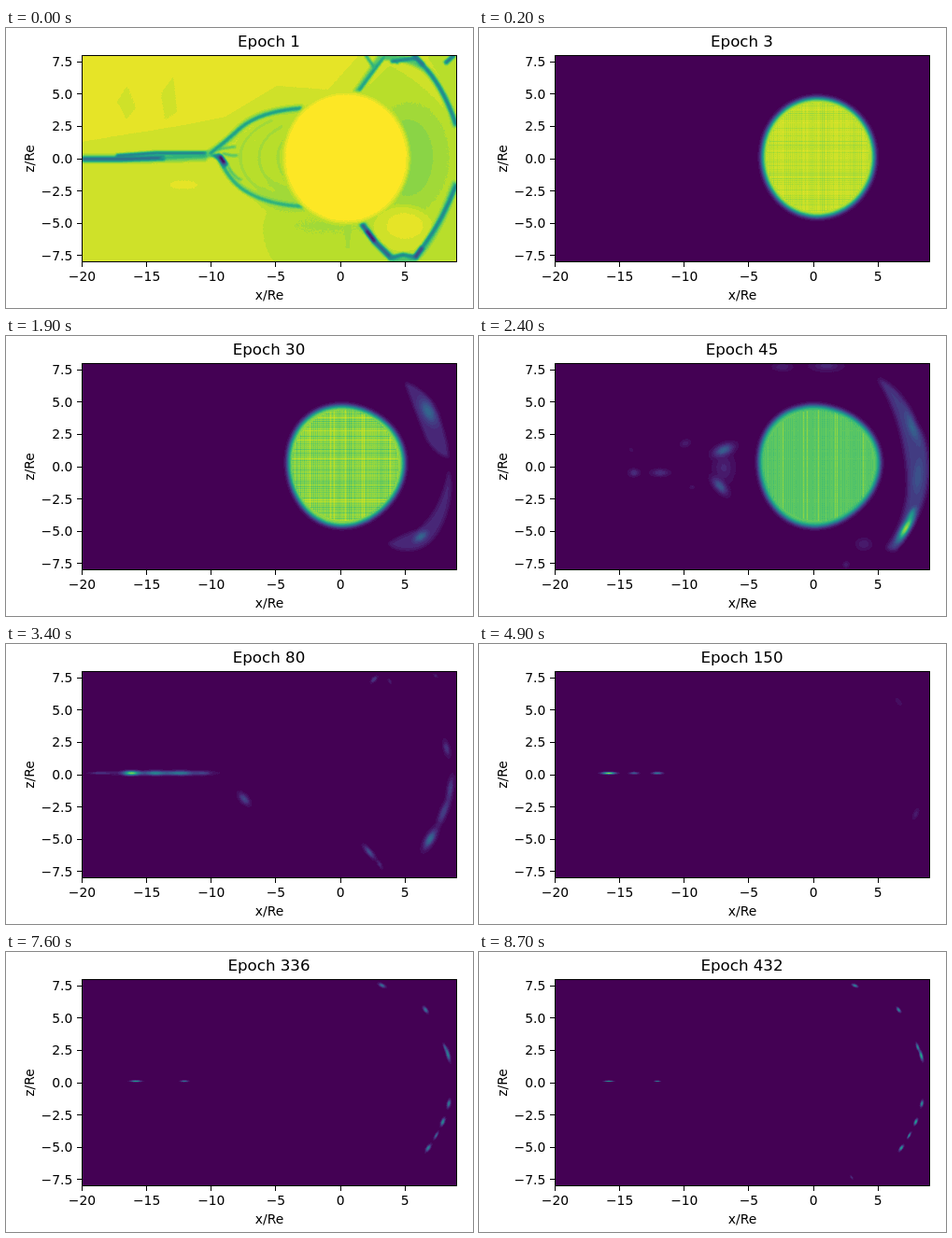
An HTML page with a canvas that plays this animation: 500 px wide and 300 px high, repeating every 8800 ms.

```html
<!DOCTYPE html>
<html lang="en">
<head>
<meta charset="utf-8">
<title>Epoch plot</title>
<style>
  html, body { margin: 0; width: 100%; height: 100%; overflow: hidden; background: #fff; }
  canvas { position: absolute; left: 81px; top: 29px; }
  svg { position: absolute; left: 0; top: 0; font: 13.89px "DejaVu Sans", sans-serif; }
  .lines { fill: none; stroke: #000; shape-rendering: crispEdges; }
</style>
</head>
<body>
<canvas id="field" width="402" height="222"></canvas>
<svg width="500" height="300" viewBox="0 0 500 300">
  <path id="ticks" class="lines"/>
  <rect class="lines" x="81.5" y="29.5" width="401" height="221"/>
  <g id="xLabels" text-anchor="middle"></g>
  <g id="zLabels" text-anchor="end"></g>
  <text x="282" y="291" text-anchor="middle">x/Re</text>
  <text transform="translate(30 140) rotate(-90)" text-anchor="middle">z/Re</text>
  <text id="title" x="281.5" y="20" text-anchor="middle" font-size="16.67">Epoch 1</text>
</svg>
<script>
const STEP = 100, FRAMES = 88, LEVELS = 28, UNIT = 401 / 29;
const $ = id => document.getElementById(id);
const W = 402, H = 222;
const ctx = $('field').getContext('2d', { willReadFrequently: true });

// Axes
const snap = v => Math.floor(v) + 0.5;
const minus = s => s.replace('-', '\u2212');
let tickPath = '', xText = '', zText = '';
for (let x = -20; x <= 5; x += 5) {
  const px = 81.5 + (x + 20) * UNIT;
  tickPath += `M${snap(px)} 251v4.5`;
  xText += `<text x="${px}" y="271">${minus('' + x)}</text>`;
}
for (let z = -7.5; z <= 7.5; z += 2.5) {
  const py = 140 - z * UNIT;
  tickPath += `M81 ${snap(py)}h-5`;
  zText += `<text x="71.3" y="${py + 5}">${minus(z.toFixed(1))}</text>`;
}
$('ticks').setAttribute('d', tickPath);
$('xLabels').innerHTML = xText;
$('zLabels').innerHTML = zText;

// Viridis lookup, quantised like filled contours
const stops = '440154 482878 3e4989 31688e 26828e 1f9e89 35b779 6ece58 b5de2b fde725'
  .split(' ').map(h => [0, 2, 4].map(i => parseInt(h.slice(i, i + 2), 16)));
const palette = Array.from({ length: 256 }, (_, i) => {
  const p = Math.round(i / 255 * LEVELS) / LEVELS * 9, n = Math.min(8, Math.floor(p));
  return stops[n].map((c, j) => c + (stops[n + 1][j] - c) * (p - n));
});

const gray = (v, a = 1) => {
  const n = Math.max(0, Math.min(255, v * 255));
  return `rgba(${n},${n},${n},${a})`;
};
const noise = n => { const s = Math.sin(n * 127.1) * 43758.5; return s - Math.floor(s); };

function at(t, ...keys) {
  if (t <= keys[0][0]) return keys[0][1];
  for (let i = 1; i < keys.length; i++) {
    const [t0, v0] = keys[i - 1], [t1, v1] = keys[i];
    if (t < t1) return v0 + (v1 - v0) * (t - t0) / (t1 - t0);
  }
  return keys[keys.length - 1][1];
}

const blur = px => { ctx.filter = px ? `blur(${px}px)` : 'none'; };

function fill(d, v, soft = 2) {
  blur(soft);
  ctx.fillStyle = gray(v);
  ctx.fill(new Path2D(d));
  blur(0);
}

function line(d, width, v, soft = 1, alpha = 1) {
  blur(soft);
  ctx.lineWidth = width;
  ctx.strokeStyle = gray(v, alpha);
  ctx.stroke(new Path2D(d));
  blur(0);
}

function oval(x, y, rx, ry, v, soft = 2) {
  blur(soft);
  ctx.fillStyle = gray(v);
  ctx.beginPath();
  ctx.ellipse(x, y, rx, ry, 0, 0, 7);
  ctx.fill();
  blur(0);
}

// Bell-shaped elongated spot added to the field
function spot(x, y, len, wid, deg, v) {
  if (v <= 0.005) return;
  ctx.save();
  ctx.translate(x, y);
  ctx.rotate(deg * Math.PI / 180);
  ctx.scale(len, wid);
  const g = ctx.createRadialGradient(0, 0, 0, 0, 0, 1);
  [1, 0.78, 0.35, 0.1, 0].forEach((k, i) => g.addColorStop(i / 4, gray(v * k)));
  ctx.fillStyle = g;
  ctx.fillRect(-1, -1, 2, 2);
  ctx.restore();
}

// Spot lying along the curved boundary on the right
function arcSpot(y, len, wid, v, dx = 0) {
  const d = y - 138;
  spot(477 - 0.0048 * d * d + dx, y, len, wid, Math.atan2(1, -0.0096 * d) * 180 / Math.PI, v);
}

function drawMagnetosphere() {
  ctx.fillStyle = gray(0.935);
  ctx.fillRect(81, 29, W, H);
  fill('M81 29H378L345 66 290 62 235 95 190 104 81 122Z', 0.962, 1);
  fill('M118 80L130 60 140 85 128 100ZM165 70L180 50 184 90 170 100Z', 0.94, 1);
  oval(190, 168, 16, 5, 0.955);
  fill('M230 140Q270 85 330 84L380 70 420 30H482V250H285Q262 205 290 190Q250 178 230 140Z', 0.895, 2);
  oval(302, 180, 34, 18, 0.865, 4);
  oval(345, 212, 45, 14, 0.875, 4);
  oval(432, 139, 45, 62, 0.87, 3);
  oval(430, 139, 28, 42, 0.82, 3);
  fill('M390 29H450Q478 70 478 100Q455 60 390 29Z', 0.93, 2);
  oval(425, 215, 32, 24, 0.935, 2);
  oval(427, 212, 20, 14, 0.955, 2);
  line('M366 206V236', 3, 0.83);

  for (let i = 0; i < 6; i++) {
    ctx.beginPath();
    ctx.ellipse(325, 139, 34 + i * 10, 32 + i * 4, 0, 2.2, 4.15);
    blur(0.8);
    ctx.lineWidth = 1.6;
    ctx.strokeStyle = gray(i % 2 ? 0.92 : 0.83);
    ctx.stroke();
    blur(0);
  }
  // Tail sheet and its two branches
  line('M81 140H150L215 138', 8, 0.76, 1.5);
  line('M81 140.5H125L170 139', 4.5, 0.35);
  line('M118 137L160 134 215 134 228 138', 3.5, 0.4);
  line('M165 139L218 137', 2.5, 0.6);
  line('M215 136Q235 124 250 108Q270 88 318 86', 7, 0.79, 1.5);
  line('M218 135Q235 122 250 108Q272 89 316 86', 2.6, 0.48, 0.9);
  line('M226 130L246 127M232 134Q243 138 248 136', 2, 0.65);
  line('M230 142Q240 165 260 176Q285 190 320 191', 6, 0.79, 1.5);
  line('M231 145Q242 168 262 178Q285 190 318 191', 2.4, 0.56, 0.9);
  line('M238 148Q242 158 252 163', 2, 0.66);
  line('M226 136L236 148', 6, 0.4);
  line('M229 137L234 145', 4, 0, 0.8);
  // Upper and lower right boundaries
  line('M374 70Q388 52 402 29', 6, 0.74, 1.5);
  line('M378 67Q390 50 405 31L440 34', 2.4, 0.5);
  line('M385 29L394 42M410 29L420 38', 3, 0.6);
  line('M405 31Q440 32 455 50Q472 72 482 106', 6, 0.72, 1.5);
  line('M412 36L440 32 452 46Q470 68 482 104', 3, 0.42);
  line('M436 29L447 40M470 38L480 29', 4, 0.4);
  line('M380 208L398 232 416 249H436Q462 222 482 165', 7, 0.7, 1.5);
  line('M381 210L395 229 412 246', 4.5, 0.3);
  line('M386 217L395 229', 3.5, 0.05);
  line('M410 247L425 243 440 246', 4, 0.45);
  line('M438 246L448 232Q468 205 482 168', 3, 0.42);
  line('M438 246L446 235', 4, 0.22);

  oval(364, 139, 69, 72, 0.91, 1);
  oval(364, 139, 66.5, 69.5, 0.985, 0.8);
}

function drawDisc(t) {
  const v = at(t, [100, 0.95], [200, 0.93], [1900, 0.85], [2400, 0.75], [2600, 0.6], [3000, 0.12], [3200, 0]);
  if (v < 0.01) return;
  const rx = at(t, [200, 60], [1900, 62], [2400, 64.5]);
  const ry = at(t, [200, 63.5], [2400, 64.5]);
  const warp = at(t, [200, 0.3], [2400, 1.8]);
  const path = new Path2D();
  for (let i = 0; i < 72; i++) {
    const a = i * Math.PI / 36, w = warp * Math.cos(3 * a + 0.6);
    path.lineTo(363 + (rx + w) * Math.cos(a), 138.5 + (ry + w) * Math.sin(a));
  }
  path.closePath();
  blur(2.6);
  ctx.fillStyle = gray(v);
  ctx.fill(path);
  blur(0);

  // Woven texture inside the disc
  const rows = at(t, [200, 0.07], [1900, 0.13], [2400, 0.02]);
  const cols = at(t, [200, 0.07], [1900, 0.12], [2400, 0.08]);
  ctx.save();
  ctx.beginPath();
  ctx.ellipse(363, 138.5, rx - 5, ry - 5, 0, 0, 7);
  ctx.clip();
  const thread = (n, strength) => {
    const r = noise(n);
    ctx.fillStyle = r > 0.87 ? gray(1, strength * 3) : gray(0, strength * r);
  };
  for (let x = 299; x < 428; x += 2) {
    thread(x, cols);
    ctx.fillRect(x, 70, 1, 140);
  }
  for (let y = 71; y < 207; y += 2) {
    thread(y + 500, rows);
    ctx.fillRect(295, y, 136, 1);
  }
  ctx.restore();
}

function drawCrescents(t) {
  const early = at(t, [1200, 0], [1900, 1], [2400, 0]);
  if (early > 0) {
    fill('M427 50Q440 52 455 70Q472 100 474 130Q460 128 450 110Q440 85 427 50Z', 0.1 * early, 1.5);
    fill('M409 222Q425 212 440 208Q465 190 474 143Q481 170 468 200Q455 230 430 230Q415 230 409 222Z', 0.09 * early, 1.5);
    spot(452, 81, 26, 13, 62, 0.24 * early);
    spot(444, 215, 16, 9, -35, 0.25 * early);
  }
  const late = at(t, [1900, 0], [2400, 1], [2900, 0.5], [3300, 0]);
  if (late > 0) {
    fill('M427 45Q455 58 468 95Q482 110 481 150Q478 190 445 230L436 228Q462 190 459 150Q455 90 427 45Z', 0.16 * late, 2);
    spot(464, 98, 32, 10, 70, 0.16 * late);
    spot(470, 150, 40, 11, 95, 0.1 * late);
    spot(457, 206, 28, 8, -60, 0.72 * late);
    spot(463, 190, 14, 6, -62, 0.25 * late);
    spot(412, 223, 14, 11, 0, 0.09 * late);
    spot(372, 32, 28, 10, 0, 0.11 * late);
    spot(325, 33, 18, 8, 0, 0.09 * late);
    spot(393, 245, 6, 6, 0, 0.08 * late);
  }
}

function drawNearTail(t) {
  const v = at(t, [1900, 0], [2400, 1], [3000, 0.3], [3300, 0]);
  spot(262, 122, 20, 10, -22, 0.3 * v);
  spot(258, 161, 19, 9, 48, 0.27 * v);
  spot(262, 141, 19, 28, 0, 0.1 * v);
  spot(221, 115, 10, 7, -20, 0.08 * v);
  spot(228, 162, 5, 4, 0, 0.06 * v);
  spot(166, 146.5, 10, 7, 0, 0.14 * v);
  spot(194, 146.5, 17, 7, 0, 0.13 * v);
  spot(163, 122, 5, 4, 0, 0.05 * v);
}

function drawMiddle(t) {
  const tail = at(t, [2400, 0], [3000, 0.7], [3400, 1], [4500, 0]);
  const thin = at(t, [3400, 1], [4500, 0.6]);
  spot(165, 138.3, 76, 4.5 * thin, 0, 0.28 * tail);
  spot(134, 138.3, 15, 4.5 * thin, 0, 0.68 * tail);
  spot(160, 138.3, 15, 4.5 * thin, 0, 0.2 * tail);
  spot(188, 138.3, 21, 4.5 * thin, 0, 0.22 * tail);
  spot(211, 138.3, 15, 4 * thin, 0, 0.14 * tail);
  spot(101, 138.3, 20, 2.5, 0, 0.15 * at(t, [2400, 0], [3400, 1], [3700, 0]));

  const edge = at(t, [2700, 0], [3300, 1], [3400, 1], [3700, 0]);
  spot(255, 166, 13, 7, 48, 0.22 * edge);
  arcSpot(112, 15, 6, 0.15 * edge, -2);
  arcSpot(155, 22, 6, 0.18 * edge);
  arcSpot(180, 26, 7, 0.2 * edge);
  const low = at(t, [2700, 0], [3300, 1], [3400, 1], [4400, 0]);
  spot(454, 209, 20, 8, -60, 0.36 * low);
  spot(389, 223, 15, 5, 50, 0.25 * low);
  spot(400, 236, 9, 3.5, 60, 0.12 * edge);
  spot(394, 38, 8, 4, -45, 0.17 * low);
  spot(411, 40, 5, 3, 50, 0.09 * edge);
  spot(460, 34, 5, 3, 40, 0.07 * edge);
}

function drawLate(t) {
  const grow = (start, mid, end) => at(t, [start, 0], [6400, mid], [8700, end]);
  const slim = at(t, [5000, 1.2], [6400, 1], [8700, 0.65]);
  const tail = (x, len, v) => spot(x, 138.4, len, 1.9 * slim, 0, v);
  tail(139, at(t, [4500, 13], [6400, 11], [8700, 8]), at(t, [3600, 0], [4500, 0.9], [6400, 0.65], [8700, 0.55]));
  tail(166, 8, at(t, [3600, 0], [4500, 0.35], [6400, 0.22], [7600, 0]));
  tail(191, at(t, [6400, 9], [8700, 5]), at(t, [3600, 0], [4500, 0.45], [6400, 0.34], [8700, 0.45]));

  const wide = 4 * slim;
  spot(402.5, at(t, [6400, 35.5], [8700, 36]), 8 * slim, wide, 25, grow(5200, 0.25, 0.48));
  arcSpot(62, 8 * slim, wide, grow(4600, 0.3, 0.5));
  arcSpot(at(t, [6400, 108], [8700, 111]), at(t, [6400, 15], [8700, 9]), wide, grow(5500, 0.25, 0.65));
  arcSpot(102, 7, 2.4, at(t, [6400, 0], [8700, 0.5]), -1);
  arcSpot(162.5, 9 * slim, wide, grow(5800, 0.3, 0.55));
  arcSpot(182, 9 * slim, wide, grow(4500, 0.35, 0.62));
  arcSpot(196.5, 9 * slim, 3 * slim, grow(5500, 0.15, 0.5));
  arcSpot(210, 9 * slim, wide, grow(6200, 0.3, 0.58));
  spot(399, 241.5, 4, 2, 55, at(t, [8000, 0], [8700, 0.15]));
}

function colorize() {
  const img = ctx.getImageData(0, 0, W, H), d = img.data;
  for (let i = 0; i < d.length; i += 4) {
    const c = palette[d[i]];
    d[i] = c[0]; d[i + 1] = c[1]; d[i + 2] = c[2]; d[i + 3] = 255;
  }
  ctx.putImageData(img, 0, 0);
}

function draw(frame) {
  const t = frame * STEP;
  let epoch = 1;
  for (let i = 1; i <= frame; i++) epoch += 1 + Math.floor(i / 10);
  $('title').textContent = 'Epoch ' + epoch;

  ctx.setTransform(1, 0, 0, 1, -81, -29);
  ctx.globalCompositeOperation = 'source-over';
  ctx.lineJoin = 'round';
  ctx.fillStyle = '#000';
  ctx.fillRect(81, 29, W, H);
  if (frame === 0) {
    drawMagnetosphere();
  } else {
    drawDisc(t);
    ctx.globalCompositeOperation = 'lighter';
    drawCrescents(t);
    drawNearTail(t);
    drawMiddle(t);
    drawLate(t);
  }
  colorize();
}

let shown = -1;
function tick() {
  const frame = Math.floor(performance.now() / STEP) % FRAMES;
  if (frame !== shown) draw(shown = frame);
  requestAnimationFrame(tick);
}
tick();
</script>
</body>
</html>
```
